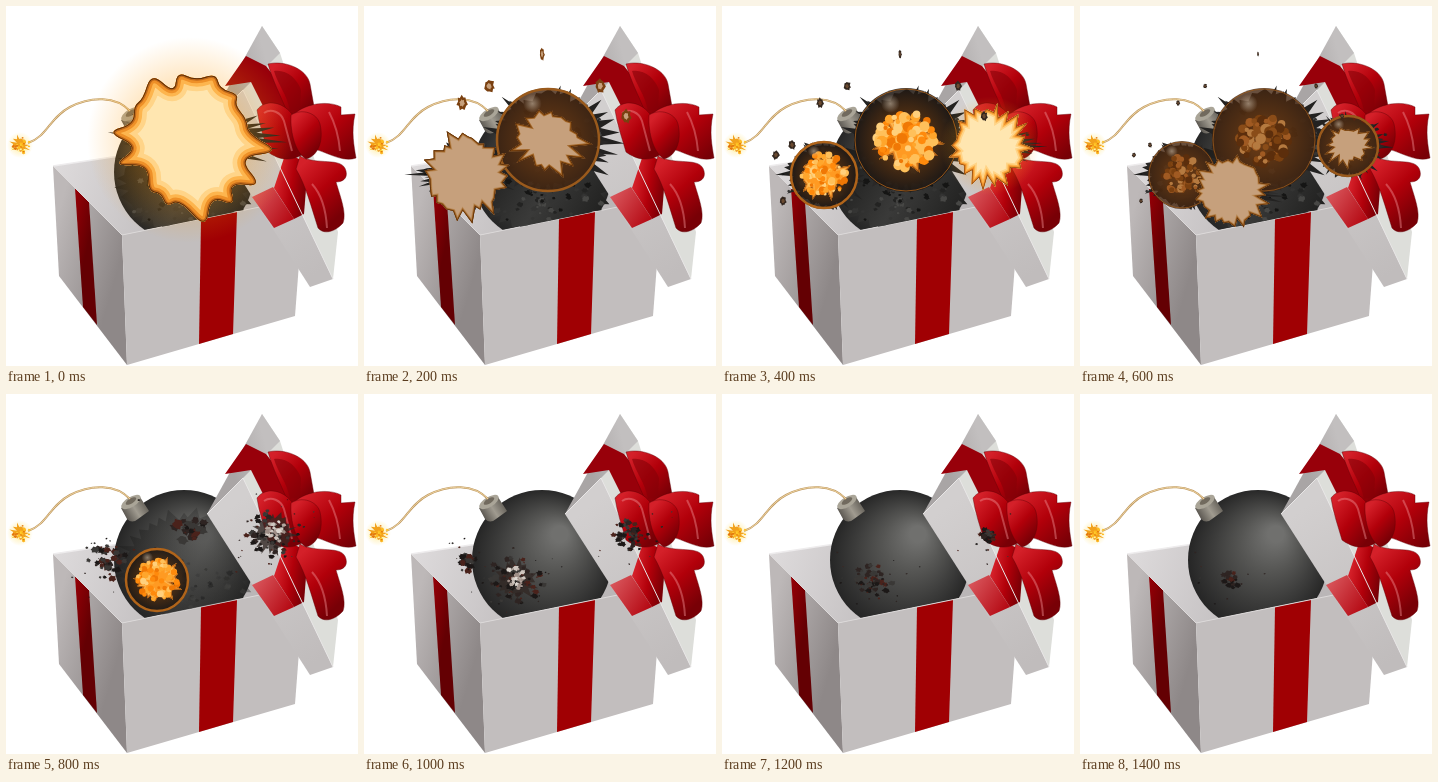
An HTML page with a canvas for the animation above (1600 ms loop, 352 px wide and 360 px high).

```html
<!DOCTYPE html>
<html lang="en">
<head>
<meta charset="utf-8">
<title>Gift bomb</title>
<style>
html, body { margin: 0; width: 100%; height: 100%; overflow: hidden; background: #fff; }
canvas { display: block; }
</style>
</head>
<body>
<canvas id="stage" width="352" height="360"></canvas>
<script>
const g = document.getElementById('stage').getContext('2d');
const STEP = 200, STEPS = 8;

const HOT = {
  core: '#ffe6b0', patch: '#ff9a22', ring: '#b0641a',
  edges: [[.5, '#ffd488'], [.32, '#fdb54e'], [.19, '#ee9028'], [.09, '#c0691a'], [.035, '#5c2e08']],
  bits: ['#ff8a0c', '#ffa62c', '#ffc05a', '#f07805', '#ffd07c']
};
const DULL = {
  core: '#c6a07c', patch: '#c6a07c', ring: '#9a5a1c',
  edges: [[.22, '#b98c5c'], [.15, '#a56a2c'], [.09, '#84480f'], [.035, '#3a1c08']],
  bits: ['#7a4010', '#a05a22', '#5c2e0c', '#b57a40', '#8a4c18']
};
const SOOT = ['#151514', '#232322', '#343433', '#474745'];
const ASH = ['#1c1817', '#2e2422', '#4a221b', '#3a3836'];
const PALE = ['#cfc6bf', '#b4a79f', '#ded7d0', '#9e8e87'];
const REDS = ['#d42029', '#b2000a', '#780006'];

// Each blast goes off one step after the one before
const BLASTS = [
  { x: 184, y: 134, r: 52, flash: 1.8, round: true },
  { x: 102, y: 169, r: 34, flash: 1.45 },
  { x: 268, y: 140, r: 31, flash: 1.45 },
  { x: 151, y: 186, r: 32, flash: 1.3 }
];

function rng(seed) {
  let s = seed * 7919 + 12345;
  const next = () => (s = s * 16807 % 2147483647) / 2147483647;
  next(); next();
  return next;
}

const shape = p => typeof p === 'string' ? new Path2D(p) : p;

function fill(path, color) {
  g.fillStyle = color;
  g.fill(shape(path));
}

function line(path, color, width) {
  g.strokeStyle = color;
  g.lineWidth = width;
  g.stroke(shape(path));
}

function clipped(path, draw) {
  g.save();
  g.clip(shape(path));
  draw();
  g.restore();
}

function grad(x0, y0, x1, y1, ...colors) {
  const r = g.createLinearGradient(x0, y0, x1, y1);
  colors.forEach((c, i) => r.addColorStop(i / (colors.length - 1), c));
  return r;
}

function oval(x, y, rx, ry = rx, turn = 0) {
  const p = new Path2D();
  p.ellipse(x, y, rx, ry, turn, 0, 7);
  return p;
}

function light(x, y, r, color) {
  const c = g.createRadialGradient(x, y, 0, x, y, r);
  c.addColorStop(0, color);
  c.addColorStop(1, color.slice(0, 7) + '00');
  fill(oval(x, y, r), c);
}

// Ragged star; the round kind has lobes in place of spikes
function star(x, y, rx, ry, n, jag, seed, round) {
  const r = rng(seed), p = new Path2D(), pts = [];
  for (let i = 0; i < 2 * n; i++) {
    const a = (i + r() * .8) * Math.PI / n;
    const k = i % 2 ? 1 - jag * (.6 + .4 * r()) : 1 - jag * .75 * r();
    pts.push([x + rx * k * Math.cos(a), y + ry * k * Math.sin(a)]);
  }
  pts.forEach(([px, py], i) => {
    const [qx, qy] = pts[(i + 1) % pts.length];
    const mx = (px + qx) / 2, my = (py + qy) / 2;
    if (!round) p.lineTo(px, py);
    else if (i) p.quadraticCurveTo(px, py, mx, my);
    else p.moveTo(mx, my);
  });
  if (round) p.quadraticCurveTo(...pts[0], (pts[0][0] + pts[1][0]) / 2, (pts[0][1] + pts[1][1]) / 2);
  p.closePath();
  return p;
}

// Core colour that darkens towards the edge
function burn(path, core, edges, size) {
  fill(path, core);
  clipped(path, () => edges.forEach(([w, c]) => line(path, c, w * size)));
}

function specks(x, y, rx, ry, n, size, colors, seed, round) {
  const r = rng(seed);
  for (let i = 0; i < n; i++) {
    const a = r() * 6.28, d = round ? Math.sqrt(r()) : r();
    const s = size * (.35 + .65 * r());
    const px = x + rx * d * Math.cos(a), py = y + ry * d * Math.sin(a);
    fill(round ? oval(px, py, s) : star(px, py, s, s * .8, 6, .5, seed + i),
      colors[Math.floor(r() * colors.length)]);
  }
}

function box() {
  fill('M47 160L232 132L298 194L116 229Z', grad(47, 160, 200, 210, '#dedbdc', '#bab6b7'));
  line('M47 160L232 132', '#eeeced', 1.5);
}

function bomb() {
  const c = g.createRadialGradient(196, 140, 8, 178, 166, 72);
  ['#70706e', '#555553', '#3c3c3b', '#242424'].forEach((k, i) => c.addColorStop(i / 3, k));
  fill(oval(178, 166, 70), c);
  fill('M115 114L121 125Q126 130 132 125L143 117L134 103Z', grad(118, 122, 140, 108, '#56524c', '#a09b90', '#5f5b54'));
  fill(oval(125, 108, 11, 5, -.55), '#aaa598');
  fill(oval(125, 107, 6, 2.5, -.55), '#716a5e');
}

function fuse() {
  const p = 'M22 137C42 130 43 112 64 101S110 90 124 105';
  line(p, '#c09a62', 2);
  line(p, '#ecd2a0', 1);
  light(14, 139, 13, '#ffd84088');
  fill(star(14, 139, 12, 11, 13, .7, 8), '#f2a11c');
  specks(14, 139, 10, 9, 30, 2.4, ['#e47709', '#fff4a0', '#ffd93a', '#ffbf22'], 3);
}

function front() {
  fill('M47 160L116 229L121 359L53 270Z', grad(50, 215, 120, 235, '#bdb8b8', '#8e8888'));
  fill('M116 229L298 192L289 310L121 359Z', '#c2bebe');
  fill('M69 182L83 196L91 319L77 301Z', grad(70, 190, 92, 195, '#920006', '#640003'));
  fill('M195 213L231 205.5L227 328L193 338Z', '#a00003');
  line('M47 160L116 229L298 192', '#dcd9d9', 1);
}

function lid() {
  fill('M256 20L274 47L332 226L327 273L237 84Z', '#dddeda');
  fill('M256 20L201 120L237 84L274 47Z', grad(225, 70, 262, 60, '#a9a5a5', '#c2bfbf'));
  fill('M201 120L237 84L327 273L304 281Z', grad(215, 120, 320, 260, '#d2cfcf', '#c0bcbc'));
  fill('M240 50L219 80L245 76L262 110L290 98L260 60Z', '#98000a');
  fill('M246 191L267 181L288 213L268 222Z', grad(248, 190, 286, 215, '#d8545a', '#b40812'));
  fill('M268 182L280 146L302 158L298 208L288 213Z', grad(270, 180, 300, 185, ...REDS));
  line('M201 120L237 84L327 273', '#e8e6e6', 1);
}

function bow() {
  const parts = [
    ['M294 150C310 160 337 150 340 165C342 173 336 176 330 176C334 190 341 207 337 217C329 226 318 229 312 222C305 200 300 180 290 163Z', 295, 160, 338, 205],
    ['M262 58C277 54 301 62 304 78L309 106L286 122C281 100 270 85 262 58Z', 264, 66, 304, 100],
    ['M288 108C302 96 324 95 335 101L335 109L349 108C345 126 348 140 350 152C333 158 314 140 297 142Z', 300, 100, 346, 148],
    ['M251 104C258 94 275 94 286 108L298 148C281 158 269 151 262 146C258 132 253 118 251 104Z', 252, 110, 292, 140],
    ['M285 109C296 102 311 107 314 118C318 135 312 150 300 153C290 147 284 128 285 109Z', 287, 115, 314, 140]
  ];
  for (const [d, ...axis] of parts) {
    fill(d, grad(...axis, ...REDS));
    line(d, '#60000688', .8);
  }
  fill('M268 65C280 63 291 72 295 84L294 103L284 105C281 88 272 79 268 65Z', '#86000899');
  line('M258 107C265 102 275 106 278 115L286 145M323 106C330 119 333 133 334 145M306 178C316 189 320 204 321 222', '#ef8f9470', 2);
}

function soot(alpha) {
  g.globalAlpha = alpha;
  clipped('M0 0H352V178L258 200L116 229L47 160V0Z', () => {
    fill(star(180, 174, 76, 62, 34, .25, 12), grad(120, 150, 240, 220, '#1c1c1b', '#3a3a39', '#1e1e1d'));
    specks(178, 195, 60, 30, 70, 5, SOOT, 22);
  });
  g.globalAlpha = 1;
}

function smoke({ x, y, r }, age, seed) {
  const long = age ? 1.5 : 1.9, tall = age ? 1.15 : .7;
  fill(star(x, y, r * long, r * tall, 30, .5, seed), '#232221');
  fill(star(x, y, r * 1.2, r * 1.1, 24, .3, seed + 1), '#2a2827');
  specks(x, y, r * 1.3, r, 40, r * .13, SOOT, seed + 2);
}

function flash({ x, y, r, flash, round }, tone, seed) {
  const size = r * flash;
  const path = star(x, y, size, size, round ? 14 : 22, round ? .5 : .36, seed, round);
  if (tone === HOT) light(x, y, size * 1.1, '#ff9c0b99');
  burn(path, tone.core, tone.edges, round ? r : r * .6);
}

function fireball({ x, y, r }, age, tone, seed) {
  const hot = tone === HOT, size = r * (1 - .12 * age);
  fill(oval(x, y, r), hot ? '#1b1714dd' : '#40240fcc');
  light(x, y, r, hot ? '#d0680888' : '#8a4a14aa');
  line(oval(x, y, r - 1), tone.ring, age === 1 ? 2.5 : .8);
  if (hot || age === 1) burn(star(x, y, size, size * .9, 16, .5, seed), tone.patch, tone.edges.slice(1), r * .5);
  if (hot || age > 1) specks(x, y, size * .75, size * .7, 90, r * .11, tone.bits, seed + 5, true);
  light(x - r * .3, y - r * .7, r * .18, '#c8b8a499');
}

function residue({ x, y, r }, age, seed) {
  const left = 1 - (age - 2) / 3;
  if (left <= 0) return;
  if (age === 2) fill(star(x, y, r * .8, r * .75, 18, .5, seed), '#332925cc');
  specks(x, y, r * .9 * left, r * .8 * left, 75 * left, r * .16, ASH, seed);
  specks(x, y, r * 1.6, r * 1.2, 26 * left, 2, ASH, seed + 1);
  if (age === 2) specks(x + 2, y - 3, r * .35, r * .35, 30, r * .14, PALE, seed + 2);
}

// Splinters that shrink as they cool
function chips(step) {
  const tone = step % 2 ? DULL : HOT, size = 11 - 2.6 * step;
  const spots = [[178, 48], [125, 80], [98, 97], [236, 80], [262, 110], [70, 139], [54, 149], [61, 195]];
  spots.slice(0, step > 1 ? 8 : 5).forEach(([x, y], i) => {
    const slim = i ? .75 : .35;
    fill(star(x, y, size * slim, size, 7, .4, 60 + i), step > 1 ? '#33271f' : tone.bits[0]);
    fill(star(x, y, size * slim * .5, size * .5, 6, .4, 60 + i), step > 1 ? '#6a4a30' : tone.core);
  });
}

function draw(step) {
  const tone = step % 2 ? DULL : HOT;
  const live = BLASTS.map((b, i) => [b, step - i, 20 + i * 10]).filter(([, age]) => age >= 0);
  fill('M0 0H352V360H0Z', '#fff');
  box();
  clipped('M0 0H352V180L258 200L116 229L47 160H0Z', bomb);
  fuse();
  front();
  if (step < 5) soot(step < 4 ? 1 : .4);
  lid();
  bow();
  if (step < 4) for (const [b, age, seed] of live) smoke(b, age, seed);
  for (const [b, age, seed] of live) {
    if (!age) flash(b, tone, seed);
    else if (step < 4 || age === 1) fireball(b, age, tone, seed);
    else residue(b, age, seed);
  }
  if (step > 0 && step < 4) chips(step);
}

let shown = -1;
function tick(now) {
  const step = Math.floor(now / STEP) % STEPS;
  if (step !== shown) draw(shown = step);
  requestAnimationFrame(tick);
}
tick(0);
</script>
</body>
</html>
```
